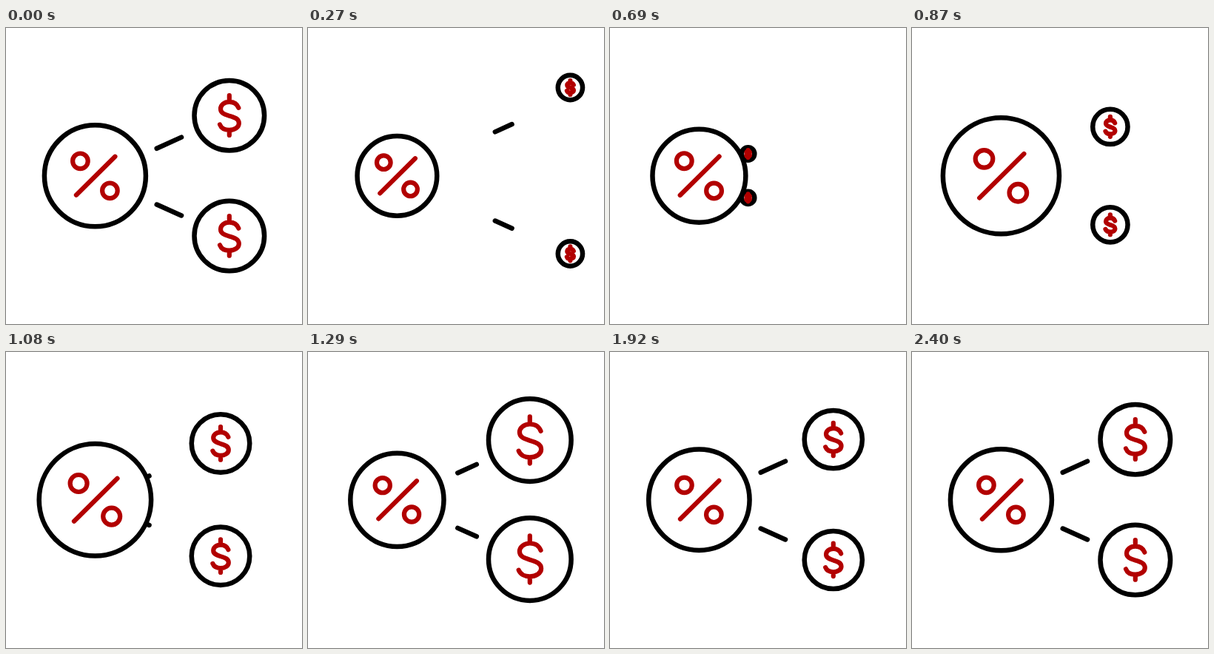
These frames come from a looping animation (400 by 400 pixels, 4.43 s). An HTML page:

```html
<!DOCTYPE html>
<html lang="en">
<head>
<meta charset="utf-8">
<title>Percent split</title>
<style>
  html, body { margin: 0; width: 100%; height: 100%; overflow: hidden; background: #fff; }
  svg { display: block; width: 100%; height: 100%; }
  circle, path { fill: none; stroke: #000; stroke-width: 6.5; stroke-linecap: round; stroke-linejoin: round; vector-effect: non-scaling-stroke; }
  .disc { fill: #fff; }
  .red { stroke: #b20000; stroke-width: 6.2; }
</style>
</head>
<body>
<svg viewBox="0 0 400 400">
  <defs>
    <g id="coin">
      <circle class="disc" r="47.3"/>
      <path class="red" d="M12.5-10.3C10.5-15.5 6-18.3 0-18.3C-7-18.3-11.8-14-11.8-9C-11.8-3-6-1.5 0 .5C7 2.5 13 4.5 13 10.5C13 16 7 19.7 0 19.7C-6 19.7-11 17-12.8 12.3M0-27V-18.3M0 19.7V26.7"/>
    </g>
  </defs>
  <path class="link"/>
  <path class="link"/>
  <use class="coin" href="#coin"/>
  <use class="coin" href="#coin"/>
  <circle id="hub" class="disc" r="68.5"/>
  <g id="percent">
    <path class="red" d="M-25.5 26L27-26"/>
    <circle class="red" cx="-20" cy="-20" r="10.3"/>
    <circle class="red" cx="20" cy="20" r="10.3"/>
  </g>
</svg>
<script>
const LOOP = 4430, STEP = 30, END = 2400, SWAP = 510;
const HUB = [120.4, 199.8], ROOT = [120, 201];
const coins = [
  { home: [301.8, 118.2], exit: [383, 60], aim: [302, 118] },
  { home: [301.8, 281], exit: [383, 318], aim: [302, 282.6] }
];

// Smooth curve through [time, value] keys, flat at peaks and ends.
function curve(...keys) {
  const last = keys.length - 1;
  const slope = i => (keys[i + 1][1] - keys[i][1]) / (keys[i + 1][0] - keys[i][0]);
  const tangent = i => {
    if (i === 0 || i === last) return 0;
    const a = slope(i - 1), b = slope(i);
    return a * b > 0 ? 2 * a * b / (a + b) : 0;
  };
  return t => {
    if (t <= keys[0][0]) return keys[0][1];
    if (t >= keys[last][0]) return keys[last][1];
    const i = keys.findIndex(k => k[0] > t) - 1;
    const [t0, v0] = keys[i], [t1, v1] = keys[i + 1];
    const d = t1 - t0, u = (t - t0) / d, w = 1 - u;
    return v0 * w * w * (1 + 2 * u) + v1 * u * u * (3 - 2 * u)
      + d * u * w * (tangent(i) * w - tangent(i + 1) * u);
  };
}

const hubScale = curve([0, 1], [450, .67], [930, 1.168], [1470, .835], [1970, 1]);
const signScale = curve([0, 1], [450, .855], [930, 1.16], [1470, .92], [1970, 1]);

const leave = curve([0, 0], [450, 1]);
const arrive = curve([SWAP, 0], [870, .813], [1080, .935], [1290, .989], [1500, 1]);
const grow = curve([SWAP, 0], [870, .5], [1080, .83], [1290, 1.18], [1410, 1.24], [1940, .825], [2400, 1]);

// Both ends of a link, as fractions of the way from root to aim.
const tailOut = curve([0, .46], [540, 1]);
const headOut = curve([0, .643], [480, 1]);
const tailIn = curve([570, 0], [1350, .46]);
const headIn = curve([570, 0], [1440, .643]);

const hub = document.getElementById("hub");
const percent = document.getElementById("percent");
const coinEls = document.querySelectorAll(".coin");
const linkEls = document.querySelectorAll(".link");

const mix = (a, b, u) => a.map((v, i) => v + (b[i] - v) * u);
const show = (el, on) => el.setAttribute("visibility", on ? "visible" : "hidden");
const place = (el, [x, y], s) => el.setAttribute("transform", `translate(${x} ${y}) scale(${s})`);

function draw(t) {
  const out = t < SWAP;
  place(hub, HUB, hubScale(t));
  place(percent, HUB, signScale(t));
  coins.forEach(({ home, exit, aim }, i) => {
    const size = out ? 1 - leave(t) : grow(t);
    const spot = out ? mix(home, exit, leave(t)) : mix(HUB, home, arrive(t));
    show(coinEls[i], size > .001);
    place(coinEls[i], spot, Math.max(size, .001));

    const tail = mix(ROOT, aim, (out ? tailOut : tailIn)(t));
    const head = mix(ROOT, aim, (out ? headOut : headIn)(t));
    show(linkEls[i], out || t > 570);
    linkEls[i].setAttribute("d", `M${tail}L${head}`);
  });
}

const start = performance.now();
function tick() {
  const t = (performance.now() - start) % LOOP;
  draw(Math.min(END, Math.floor(t / STEP) * STEP));
  requestAnimationFrame(tick);
}
tick();
</script>
</body>
</html>
```
